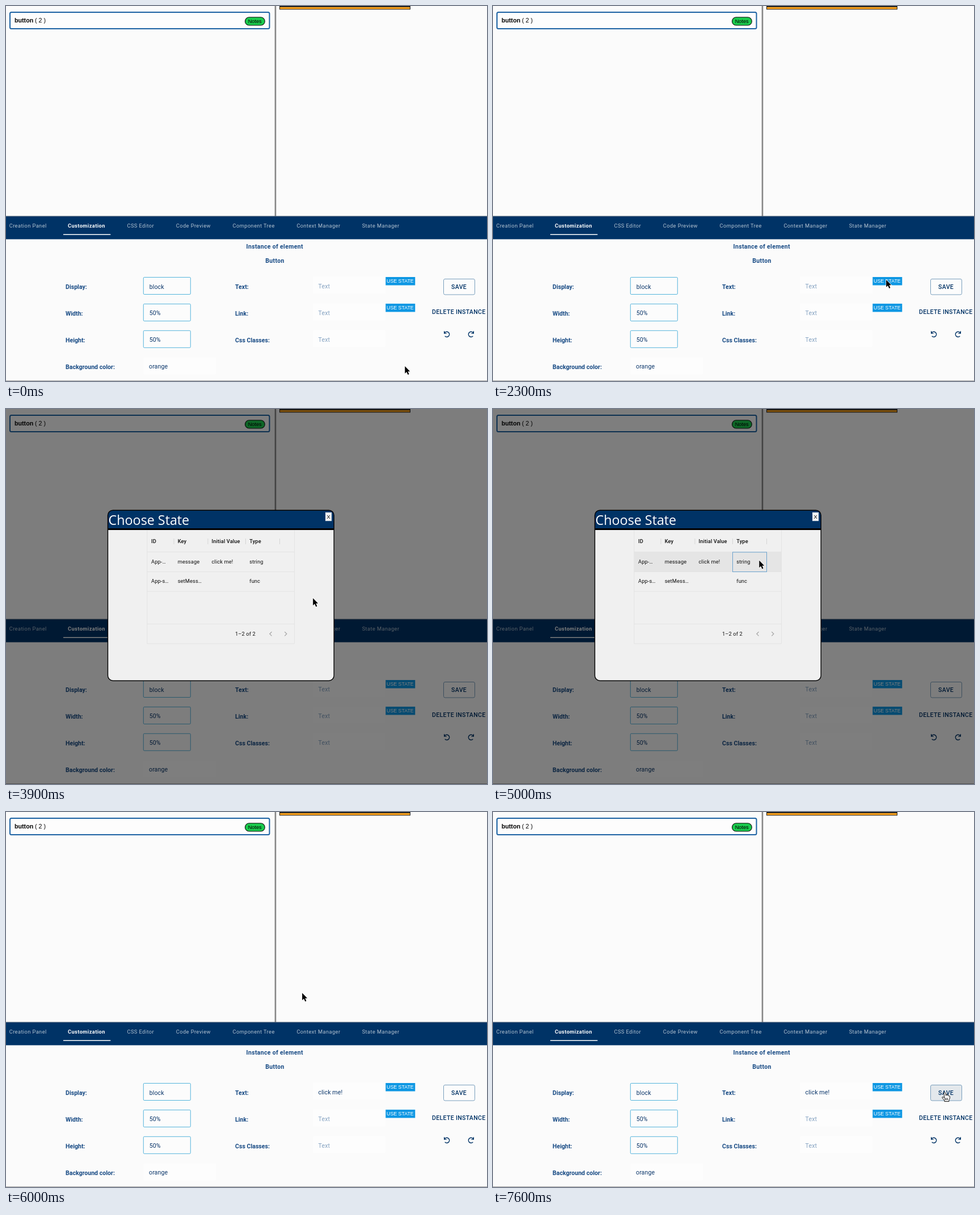
An HTML page that plays this animation: 848 px wide and 660 px high, repeating every 8 s.

```html
<!DOCTYPE html>
<html lang="en">
<head>
<meta charset="utf-8">
<title>Choose state</title>
<style>
  html, body { margin: 0; width: 100%; height: 100%; overflow: hidden; background: #fbfbfb; }
  svg { display: block; width: 848px; height: 660px; }
  text { font: 10.6px Roboto, sans-serif; letter-spacing: .1px; fill: #0b1f38; white-space: pre; }
  .label { font-weight: 600; fill: #174a84; letter-spacing: 0; }
  .title { font-weight: 600; fill: #174a84; letter-spacing: .3px; }
  .value { fill: #0c376b; }
  .hint { fill: #86a3c2; }
  .tab { font-size: 9.3px; letter-spacing: .4px; fill: #b3c2d1; }
  .on { font-weight: 600; fill: #fff; }
  .action { font-weight: 500; fill: #003366; letter-spacing: .3px; }
  .plain { font: 10.7px "Liberation Sans", Arial, sans-serif; fill: #000; letter-spacing: 0; }
  .strong { font-weight: bold; }
  .tiny { font-size: 9.2px; }
  .state { font-size: 8.84px; fill: #fff; }
  .heading { font: 23.3px "Open Sans", "Noto Sans", sans-serif; fill: #fff; letter-spacing: 0; }
  .cell { font-size: 9.3px; fill: #111; }
  .head { font-weight: 500; }
  .box { fill: #fcfcfc; stroke: #55b5dc; }
  .field { fill: #fdfdfd; }
  .line { fill: none; stroke: #e3e3e3; }
</style>
</head>
<body>
<svg viewBox="0 0 848 660">
  <rect width="848" height="660" fill="#fbfbfb"/>
  <rect x="7" y="11" width="457.5" height="29" rx="2.5" fill="#fdfdfd" stroke="#1c62a3" stroke-width="2"/>
  <rect x="421.5" y="19.8" width="34.8" height="14.2" rx="7.1" fill="#1acb4d" stroke="#111" stroke-width="1.1"/>
  <path d="M482 0h231v6.3h-231z" fill="#222"/>
  <path d="M483 2h229v3.3h-229z" fill="#ffa51d"/>
  <path d="M475 0V370" stroke="#868686" stroke-width="2.6"/>
  <path d="M0 370H848V410.5H0z" fill="#003366"/>
  <path d="M0 370H848" stroke="#56677a"/>
  <path d="M101 402.3H184.3" stroke="#fff" stroke-width="1.4"/>
  <path d="M0 659.5H848" stroke="#a3a3a3"/>
  <g id="page"></g>
  <rect id="save" x="771.5" y="480.5" width="55" height="27.5" rx="2.5" stroke="#7a9fbd"/>
  <text x="785" y="497.7" class="action">SAVE</text>
  <g id="undo" fill="none" stroke="#003366" stroke-width="1.4">
    <path d="M772.7 572.2v3.9h4M773 575.8a4.6 4.6 0 1 1 .8 5.3"/>
  </g>
  <use href="#undo" transform="translate(1597 0) scale(-1 1)"/>

  <g id="modal">
    <rect width="848" height="660" fill="#000" opacity=".5"/>
    <rect x="179.5" y="178.2" width="398.7" height="300" rx="9" fill="#f0f0f0"/>
    <path d="M179.5 212V187.2a9 9 0 0 1 9-9h380.7a9 9 0 0 1 9 9V212z" fill="#003366"/>
    <path d="M179.5 211.6H578" stroke="#000" stroke-width="3"/>
    <rect x="179.5" y="178.2" width="398.7" height="300" rx="9" fill="none" stroke="#000" stroke-width="1.4"/>
    <rect x="563.5" y="182.3" width="10.3" height="14.5" fill="#f4f4f4" stroke="#fff" stroke-width=".7"/>
    <rect id="hover" x="249" width="259" height="34.5" fill="#e5e5e5"/>
    <path class="line" d="M248.8 213.5V413H508.5V213.5M249 251.7H508M249 286.5H508M249 321H508M249 378.3H508"/>
    <path d="M296 228v10M356 228v10M422.5 228v10M482.5 228v10" stroke="#d5d5d5"/>
    <path d="M468.5 392.2l-3.6 3.6 3.6 3.6M491.3 392.2l3.6 3.6-3.6 3.6" fill="none" stroke="#a0a0a0" stroke-width="1.2"/>
    <rect id="focus" x="422.5" y="252" width="60" height="34.5" fill="none" stroke="#6ba2cd"/>
    <g id="table"></g>
  </g>

  <path id="arrow" d="M0 0V12.7L3 10L5.2 15L7.3 14.1L5.2 9.2H9Z" stroke="#fff" stroke-width="1.4" paint-order="stroke"/>
  <path id="hand" d="M-1.6 .8Q0-1.2 1.2 .8L2.2 6Q4-.0 5 5.8Q6.6 4.8 7.2 6.6Q8.8 6 9 8Q8.9 12 7.4 13.5V16.2H-.6V14.6L-4.6 9.6Q-4.8 7.4-2.6 8.4L-.6 10ZM2.5 10v4M4.8 10v4M.4 10v4" fill="#fff" stroke="#111" stroke-linejoin="round"/>
</svg>
<script>
const $ = id => document.getElementById(id);
const text = (x, y, cls, words) => `<text x="${x}" y="${y}" class="${cls}">${words}</text>`;
const box = (x, y, w, h, cls) => `<rect x="${x}" y="${y}" width="${w}" height="${h}" rx="1.5" class="${cls}"/>`;
const show = (id, on) => $(id).setAttribute("visibility", on ? "inherit" : "hidden");

const tabs = [[5.7, "Creation Panel"], [109, "Customization"], [213.5, "CSS Editor"], [299.8, "Code Preview"],
  [399.6, "Component Tree"], [512.4, "Context Manager"], [627.7, "State Manager"]];
let page = text(15, 29.2, "plain strong", "button") + text(51, 29.2, "plain", "( 2 )") +
  text(426.7, 30, "plain tiny", "Notes") +
  text(423.5, 427.2, "title", "Instance of element") + text(457.3, 452.2, "title", "Button") +
  text(751, 541.9, "action", "DELETE INSTANCE");
tabs.forEach(([x, name], i) => page += text(x, 390, i == 1 ? "tab on" : "tab", name));

const left = [["Display:", "block"], ["Width:", "50%"], ["Height:", "50%"], ["Background color:", "orange"]];
const right = ["Text:", "Link:", "Css Classes:"];
left.forEach(([name, value], i) => {
  const y = 477.5 + i * 46.9;
  page += text(105, y + 20.4, "label", name);
  page += i < 3 ? box(242.3, y, 83, 30, "box") : box(242, y, 128, 30, "field");
  page += text(i < 3 ? 252.7 : 252, y + 20, "value", value);
  if (i == 3) return;
  page += text(404, y + 20.4, "label", right[i]) + box(541, y - 1, 128, 30, "field");
  page += `<text id="input${i}" x="550.5" y="${y + 19.8}" class="hint">Text</text>`;
  if (i < 2) page += `<rect x="669.3" y="${y - .5}" width="52" height="14.5" fill="#0d97e3"/>` +
    text(671, y + 9.8, "plain state", "USE STATE");
});
$("page").innerHTML = page;

const columns = [256, 302.7, 362.6, 429.3];
const rows = [["ID", "Key", "Initial Value", "Type"],
  ["App-…", "message", "click me!", "string"], ["App-s…", "setMess…", "", "func"]];
$("table").innerHTML = text(180.5, 203.7, "heading", "Choose State") +
  text(565.4, 192.5, "plain tiny", "X") + text(404, 398.9, "cell", "1–2 of 2") +
  rows.map((row, r) => row.map((word, c) =>
    text(columns[c], [235.8, 272, 306.4][r], r ? "cell" : "cell head", word)).join("")).join("");

// Pointer stops: time, x, y
const stops = [[0, 703.3, 634], [500, 703.3, 634], [1400, 687, 497], [1700, 685, 481], [2100, 685, 481],
  [2300, 693.2, 482], [3300, 693.2, 482], [4200, 488, 281], [4500, 469.3, 266.5], [5800, 469.3, 266.5],
  [6500, 736, 529], [6600, 736, 529], [6700, 741.3, 524], [7500, 796.5, 493.3], [8000, 796.5, 493.3]];

function pointer(t) {
  const i = stops.findIndex(s => s[0] > t);
  const [a, b] = [stops[i - 1], stops[i]];
  const p = (t - a[0]) / (b[0] - a[0]), e = p * p * (3 - 2 * p);
  return [a[1] + (b[1] - a[1]) * e, a[2] + (b[2] - a[2]) * e];
}

const start = performance.now();
function draw() {
  const t = Math.floor((performance.now() - start) % 8000 / 100) * 100;
  const [x, y] = pointer(t);
  const open = t >= 2600 && t < 5200, filled = t >= 5200;
  show("modal", open);
  show("focus", t >= 5000 && open);
  const row = Math.floor((y - 252) / 34.5);
  show("hover", open && x > 249 && x < 508 && (row == 0 || row == 1));
  $("hover").setAttribute("y", 252 + row * 34.5);

  $("input0").textContent = filled ? "click me!" : "Text";
  $("input0").setAttribute("class", filled ? "value" : "hint");
  const onSave = x > 771 && y > 480 && y < 508;
  const onDelete = x > 747 && y > 524 && y < 552;
  $("save").setAttribute("fill", onSave ? "#e3e8ec" : "#fcfcfc");
  const hand = !open && (onSave || onDelete);
  show("hand", hand);
  show("arrow", !hand);
  for (const id of ["hand", "arrow"]) $(id).setAttribute("transform", `translate(${x} ${y})`);
  requestAnimationFrame(draw);
}
draw();
</script>
</body>
</html>
```
